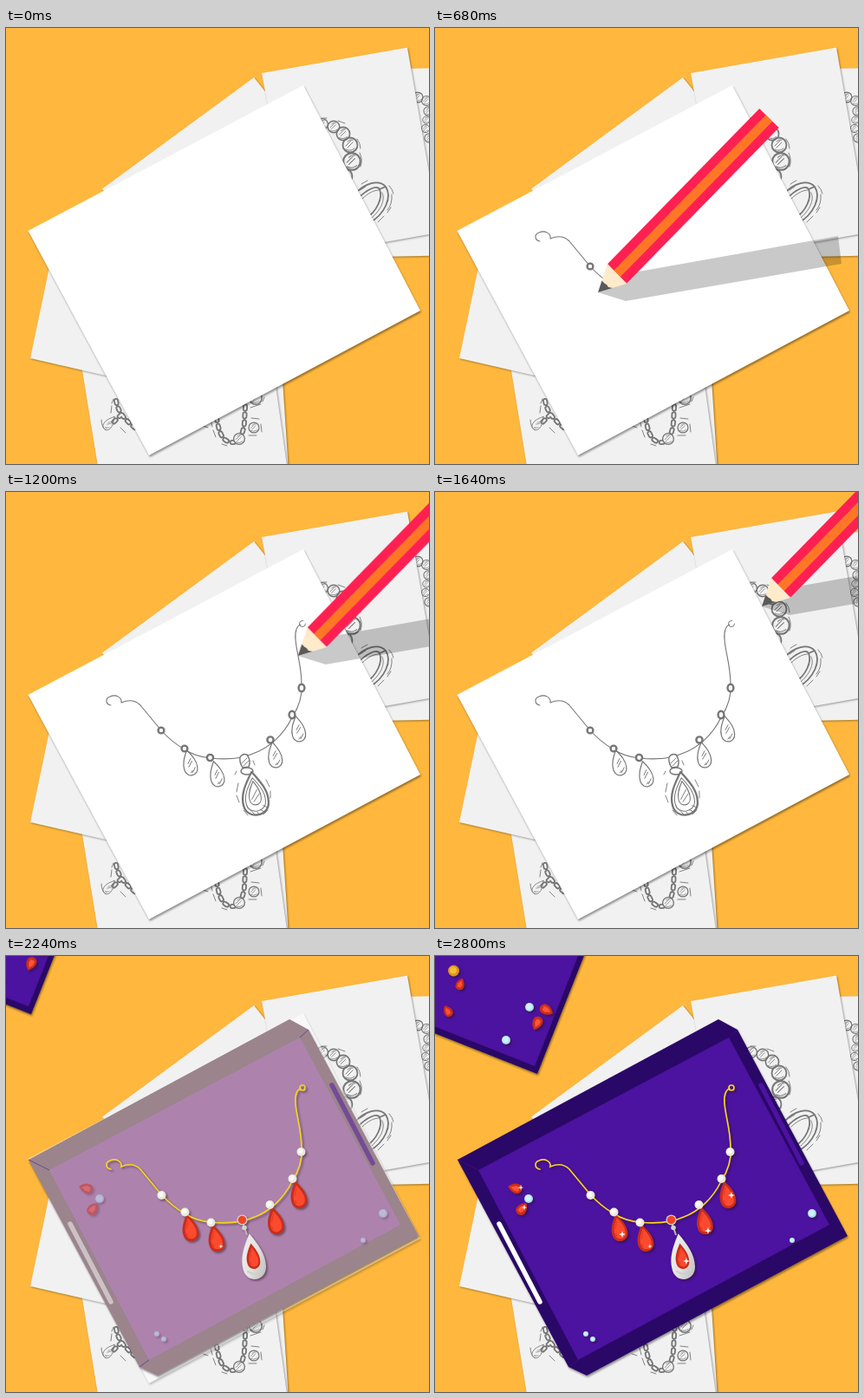
An HTML page for the animation above (3.2 s loop, 488 px wide and 503 px high).

```html
<!DOCTYPE html>
<html lang="en">
<head>
<meta charset="utf-8">
<title>Necklace sketch</title>
<style>
html, body { margin: 0; width: 100%; height: 100%; overflow: hidden; background: #ffb83d; }
.stage { position: absolute; inset: 0; overflow: hidden; }
svg { position: absolute; left: 0; top: 0; width: 488px; height: 503px; overflow: visible; }

.sheet { fill: #f1f1f1; filter: drop-shadow(1px 1px 1px rgba(0,0,0,.38)); }
.ink { fill: none; stroke: #757575; stroke-width: 1.4; stroke-linecap: round; stroke-linejoin: round; }
.thin { stroke-width: .9; }
.bold { stroke-width: 1.8; }
.link { stroke-width: 6; stroke-dasharray: 3 6; }
.hole { stroke: #f1f1f1; stroke-width: 2.4; stroke-dasharray: 3 6; }
.lift { filter: drop-shadow(2px 2px 1px rgba(40,20,20,.45)); }
.box { filter: drop-shadow(1px 2px 1px rgba(0,0,0,.4)); }

#paper, #sketch, #rim, #felt, #extras, #jewel, #corner, #pencil { animation: 3200ms infinite; }
#paper { animation-name: paper; }
#sketch { animation-name: draw; }
#rim, #felt { animation-name: tint; }
#rim { --mid: #9b848c; --full: #2a0867; }
#felt { --mid: #ad83ae; --full: #4c12a0; }
#extras { animation-name: extras; }
#jewel { animation-name: jewel; }
#corner { animation-name: corner; }
#pencil { animation-name: pencil; }

/* Each segment advances in 40 ms ticks. */
@keyframes pencil {
  0% { transform: translate(620px, 0); animation-timing-function: step-end; }
  12.5% { transform: translate(110px, 246px); animation-timing-function: steps(7); }
  21.25% { transform: translate(188px, 305px); animation-timing-function: steps(7); }
  30% { transform: translate(285px, 364px); animation-timing-function: steps(3); }
  33.75% { transform: translate(312px, 300px); animation-timing-function: steps(4); }
  38.75% { transform: translate(345px, 152px); animation-timing-function: step-end; }
  51.25% { transform: translate(377px, 132px); animation-timing-function: steps(4); }
  56.25%, 100% { transform: translate(620px, 0); }
}
@keyframes draw {
  0% { clip-path: inset(0 488px 0 0); opacity: 1; animation-timing-function: step-end; }
  12.5% { clip-path: inset(0 374px 0 0); animation-timing-function: steps(7); }
  21.25% { clip-path: inset(0 292px 0 0); animation-timing-function: steps(7); }
  30% { clip-path: inset(0 200px 0 0); animation-timing-function: steps(7); }
  38.75% { clip-path: inset(0 120px 0 0); }
  56.25% { opacity: 1; animation-timing-function: steps(7); }
  65%, 100% { clip-path: inset(0 120px 0 0); opacity: 0; }
}
@keyframes jewel {
  0%, 56.25% { opacity: 0; animation-timing-function: steps(7); }
  65%, 100% { opacity: 1; }
}
@keyframes tint {
  0% { fill: #fff; visibility: hidden; animation-timing-function: step-end; }
  66.25% { fill: #fff; visibility: visible; animation-timing-function: steps(3); }
  70% { fill: var(--mid); animation-timing-function: steps(3); }
  73.75%, 100% { fill: var(--full); visibility: visible; }
}
@keyframes extras {
  0%, 66.25% { opacity: 0; animation-timing-function: steps(6); }
  73.75%, 100% { opacity: 1; }
}
@keyframes paper {
  0%, 66.25% { opacity: 1; animation-timing-function: steps(6); }
  73.75%, 100% { opacity: 0; }
}
@keyframes corner {
  0%, 66.25% { transform: translate(-184px, -142px); animation-timing-function: cubic-bezier(.33,.67,.67,1); }
  78.75%, 100% { transform: none; }
}
.glint { fill: #fff; animation: glint 3200ms step-end infinite; animation-delay: calc(var(--at) * 1ms - 3200ms); }
@keyframes glint { 0% { opacity: 1; } 40%, 100% { opacity: 0; } }
</style>
</head>
<body>
<div class="stage">

<svg viewBox="0 0 488 503">
  <defs>
    <path id="drop" d="M0-17C6-8 10-1 9 7C8 18-8 18-9 7C-10-1-6-8 0-17Z"/>
    <linearGradient id="silver" x2="1" y2="1">
      <stop offset="0" stop-color="#f4f4f2"/><stop offset=".55" stop-color="#e2e2e0"/><stop offset="1" stop-color="#b9b9b9"/>
    </linearGradient>
    <g id="ruby">
      <use href="#drop" fill="#c92d1b"/>
      <use href="#drop" fill="#fb4a2e" transform="translate(.3 1) scale(.7 .76)"/>
      <path d="M-4 0L0-9M-5 5L-4 9" stroke="#e23a22" fill="none"/>
    </g>
    <g id="gem">
      <path d="M0-9C5-5 7 0 5 5Q0 10-5 5C-7 0-5-5 0-9Z" fill="#c92d1b"/>
      <path d="M0-6L3 0L2 4L-3 4L-3-1Z" fill="#ff5336"/>
    </g>
    <g id="pearl">
      <circle r="5" fill="#e9e8dc"/><circle cx="-1" cy="-1" r="3" fill="#fbfaf2"/>
    </g>
    <g id="bead">
      <circle r="5" fill="#a9dcf0"/><circle cx="-.6" cy="-.6" r="3.6" fill="#cdf1fb"/>
    </g>
    <g id="stone">
      <circle r="8.5" class="bold"/><path class="thin" d="M-5 1L1-5M-3 3L3-3M-3-4Q0-7 3-6M-5 5Q0 8 5 4"/>
    </g>
    <g id="tear">
      <use href="#drop" transform="scale(.85 .92)"/>
      <path class="thin" d="M-2 0L2-5M-2 4L3-2M1 11L5 6M-1 11L1 9"/>
    </g>
    <path id="star" d="M0-4L.9-.9L4 0L.9.9L0 4L-.9.9L-4 0L-.9-.9Z"/>
    <path id="strand" d="M121 246C115 245 114 238 120 236C127 233 134 237 133 243C140 240 148 239 155 246L179 275C190 287 199 293 206 297C215 303 225 306 236 307C255 309 272 308 287 301C303 295 320 281 330 260C338 248 342 236 341 222C341 200 335 185 334 170C333 160 336 154 340 153"/>
    <path id="chain" d="M127 430C129 440 132 448 152 464M133 446L124 455M243 450C245 462 248 474 256 477C268 482 274 468 275 455L277 420"/>
  </defs>

  <rect width="488" height="503" fill="#ffb83d"/>
  <path class="sheet" d="M120 400L319 405L326 512L120 512Z"/>
  <path class="sheet" d="M86 383L307 383L325 512L107 512Z"/>
  <path class="sheet" d="M28 381L115 401L200 310L60 228Z"/>
  <path class="sheet" d="M286 57L111 185.500L180 280L360 150Z"/>
  <path class="sheet" d="M400 48L502 46L502 262.500L400 264.500Z"/>
  <g class="ink">
    <use href="#stone" transform="translate(475 80) scale(.7)"/>
    <use href="#stone" transform="translate(485 84) scale(.65)"/>
    <use href="#stone" transform="translate(487 96) scale(.6)"/>
    <use href="#stone" transform="translate(485 106) scale(.5)"/>
    <use href="#stone" transform="translate(484 116) scale(.55)"/>
    <use href="#stone" transform="translate(488 127) scale(.6)"/>
  </g>
  <path class="sheet" d="M295 52L463 22.500L500 236L335 265Z"/>

  <g class="ink">
    <use href="#stone" transform="translate(365 111) scale(.75)"/>
    <use href="#stone" transform="translate(378 114) scale(.8)"/>
    <use href="#stone" transform="translate(389 122) scale(.9)"/>
    <use href="#stone" transform="translate(397 135)"/>
    <use href="#stone" transform="translate(399 154) scale(1.15)"/>
    <use href="#stone" transform="translate(391 171)"/>
    <path class="bold" d="M403 191C414 179 430 174 438 183C446 195 437 215 419 225M406 197C416 186 428 181 431 186C435 196 428 211 416 219M431 186L438 183"/>
    <path class="thin" d="M411 197C418 190 425 187 430 187M434 190C438 199 432 210 422 219M409 187L415 183M405 128q4 5 4 11M408 144q4 8 1 16M383 107l8 3M370 104l-6 0M445 192q1 11-5 18M442 182q4 4 5 9M410 180l7-4M436 217l-7 7M444 207l-4 6"/>
  </g>

  <g class="ink">
    <use href="#chain" class="link"/>
    <use href="#chain" class="hole"/>
    <use href="#stone" transform="translate(269 474) scale(.75)" fill="#f1f1f1"/>
    <use href="#stone" transform="translate(286 461) scale(.7)"/>
    <use href="#stone" transform="translate(288 427) scale(.85)"/>
    <use href="#tear" transform="translate(119 456) rotate(38) scale(.62)"/>
    <path class="thin" d="M110 452q0 8 5 12M122 436l-1 8M124 428l-2 5M236 452l2 8M239 464l3 8M227 459l6 2M283 450l9 1M294 457l1 9M280 470l9 0M282 438l12-4M298 426l-2 5M132 461l6 6M249 480l6 2"/>
  </g>
</svg>

<svg id="paper" viewBox="0 0 488 503">
  <path class="box" d="M343 66L25.500 234L165 493L478 326Z" fill="#fff"/>
</svg>

<svg id="sketch" class="ink" viewBox="0 0 488 503">
  <use href="#strand" stroke-width="1.1"/>
  <circle cx="342" cy="152" r="3.500" stroke-width="1" stroke-dasharray="17 5"/>
  <g fill="#fff" stroke-width="2.400">
    <circle cx="179" cy="275" r="3.400"/><circle cx="206" cy="296" r="3.400"/><circle cx="235.500" cy="306.500" r="3.600"/>
    <circle cx="305" cy="286" r="3.600"/><ellipse cx="330" cy="257" rx="3.400" ry="4.200"/><ellipse cx="341" cy="226" rx="3.400" ry="4.200"/>
  </g>
  <use href="#tear" transform="translate(212 313) rotate(-13)"/>
  <use href="#tear" transform="translate(243 326) rotate(-13)"/>
  <use href="#tear" transform="translate(310 304) rotate(-10)"/>
  <use href="#tear" transform="translate(337 274) rotate(-10)"/>
  <path fill="#fff" d="M270 306Q273 301 278 303Q283 310 280 317L273 318Q269 312 270 306Z"/>
  <ellipse cx="278" cy="322" rx="7" ry="4" fill="#fff"/>
  <g transform="translate(287 349) rotate(-8)">
    <use href="#drop" transform="scale(1.620 1.550)" fill="#fff"/>
    <use href="#drop" transform="translate(0 1) scale(1.250 1.200)" stroke-width=".8"/>
    <use href="#drop" transform="translate(0 -1) scale(.75 .85)"/>
    <path class="thin" d="M-4 5L3-5M-2 8L5 0M-11 13L-7 18M-6 19L-3 23M4 18L9 22M8 14L13 17M0 20L2 24"/>
  </g>
  <path class="thin" d="M272 313l6-6M274 316l6-6M268 336l-2 10M266 350l3 8M300 332l4 8M305 345l0 8M274 367l5 6M297 372l5-5M266 322l-2 4M285 310l2 5"/>
</svg>

<svg viewBox="0 0 488 503">
  <path id="rim" class="box" d="M327 73L349 85L476 323L175 484L154 474L26 235Z"/>
  <path id="felt" d="M50 247L339 94L455 310L165 466Z"/>
  <g id="extras">
    <path d="M26 235L50 247M154 474L165 466M349 85L339 94" stroke="#3b0d80" fill="none"/>
    <g fill="none" stroke-width="5.500" stroke-linecap="round">
      <path d="M74 309L121 399" stroke="#fff"/>
      <path d="M376 149L423 239" stroke="#4c12a0"/>
    </g>
    <g class="lift">
      <use href="#gem" transform="translate(93 268) rotate(-75)"/>
      <use href="#gem" transform="translate(100 292) rotate(38)"/>
      <use href="#bead" x="108" y="280"/>
      <use href="#bead" x="435" y="297"/>
      <use href="#bead" transform="translate(412 328) scale(.6)"/>
      <use href="#bead" transform="translate(174 436) scale(.6)"/>
      <use href="#bead" transform="translate(182 442) scale(.6)"/>
    </g>
  </g>
</svg>

<svg id="jewel" viewBox="0 0 488 503">
  <g class="lift">
    <g fill="none" stroke="#f6d51c" stroke-width="1.700" stroke-linecap="round">
      <use href="#strand"/><circle cx="342" cy="152" r="3"/>
    </g>
    <use href="#ruby" transform="translate(212 314) rotate(-13)"/>
    <use href="#ruby" transform="translate(242 326) rotate(-13)"/>
    <use href="#ruby" transform="translate(310.500 306) rotate(-12)"/>
    <use href="#ruby" transform="translate(337 276) rotate(-12)"/>
    <path d="M274 310L278 322" stroke="#bbb" stroke-width="2"/>
    <circle cx="275" cy="313.500" r="2.800" fill="#d2d2d0"/>
    <g transform="translate(285 348) rotate(-9)">
      <use href="#drop" transform="scale(1.480 1.650)" fill="url(#silver)"/>
      <path d="M-9 14Q0 24 10 13" fill="none" stroke="#cfcfcd" stroke-width="2"/>
      <use href="#ruby" transform="translate(0 -1) scale(.84 .92)"/>
    </g>
    <circle cx="272.500" cy="304.500" r="6" fill="#d8cfc6"/>
    <circle cx="272.500" cy="304.500" r="4.700" fill="#f04429"/>
    <use href="#pearl" x="179.500" y="276"/>
    <use href="#pearl" x="206.500" y="295.500"/>
    <use href="#pearl" x="236.500" y="307.500"/>
    <use href="#pearl" x="304.500" y="287"/>
    <use href="#pearl" x="330.500" y="257"/>
    <use href="#pearl" x="340.500" y="226"/>
  </g>
  <use class="glint" style="--at:2000" href="#star" transform="translate(248 335) scale(.7)"/>
  <use class="glint" style="--at:2400" href="#star" transform="translate(99 267) scale(.8)"/>
  <use class="glint" style="--at:2440" href="#star" transform="translate(103 290) scale(.8)"/>
  <use class="glint" style="--at:2520" href="#star" x="216" y="321"/>
  <use class="glint" style="--at:2600" href="#star" x="290" y="352"/>
  <use class="glint" style="--at:2680" href="#star" x="315" y="317"/>
  <use class="glint" style="--at:2760" href="#star" x="342" y="276"/>
</svg>

<svg id="corner" viewBox="0 0 488 503">
  <path class="box" d="M118 136L226-137L-150-137L-150 30Z" fill="#2a0867"/>
  <path d="M115 127L219-137L-150-137L-150 22Z" fill="#4c12a0"/>
  <g class="lift">
    <circle cx="21.500" cy="17" r="6.500" fill="#d9941c"/><circle cx="21" cy="16.500" r="4" fill="#f3bb3a"/>
    <use href="#gem" transform="translate(29 33) rotate(20) scale(.85)"/>
    <use href="#gem" transform="translate(15 64) rotate(-30) scale(.85)"/>
    <use href="#gem" transform="translate(128 62) rotate(118)"/>
    <use href="#gem" transform="translate(118 77) rotate(205)"/>
    <use href="#bead" x="109" y="59"/>
    <use href="#bead" x="82" y="97"/>
  </g>
</svg>

<svg id="pencil" viewBox="0 0 488 503">
  <path d="M0 0L32 10L281-33L277-65L30-21Z" fill="#000" opacity=".21"/>
  <g fill="none">
    <path d="M22-21.500L197.500-201" stroke="#ff2052" stroke-width="31.500"/>
    <path d="M22-21.500L197.500-201" stroke="#ff7726" stroke-width="10.500"/>
  </g>
  <path d="M0 0L11-33L33-10Z" fill="#ffeacb"/>
  <path d="M0 0L4.500-13.500L8-10L10-9L12-6L17-5L15-4.500Z" fill="#5a5a5a"/>
</svg>

</div>
</body>
</html>
```
